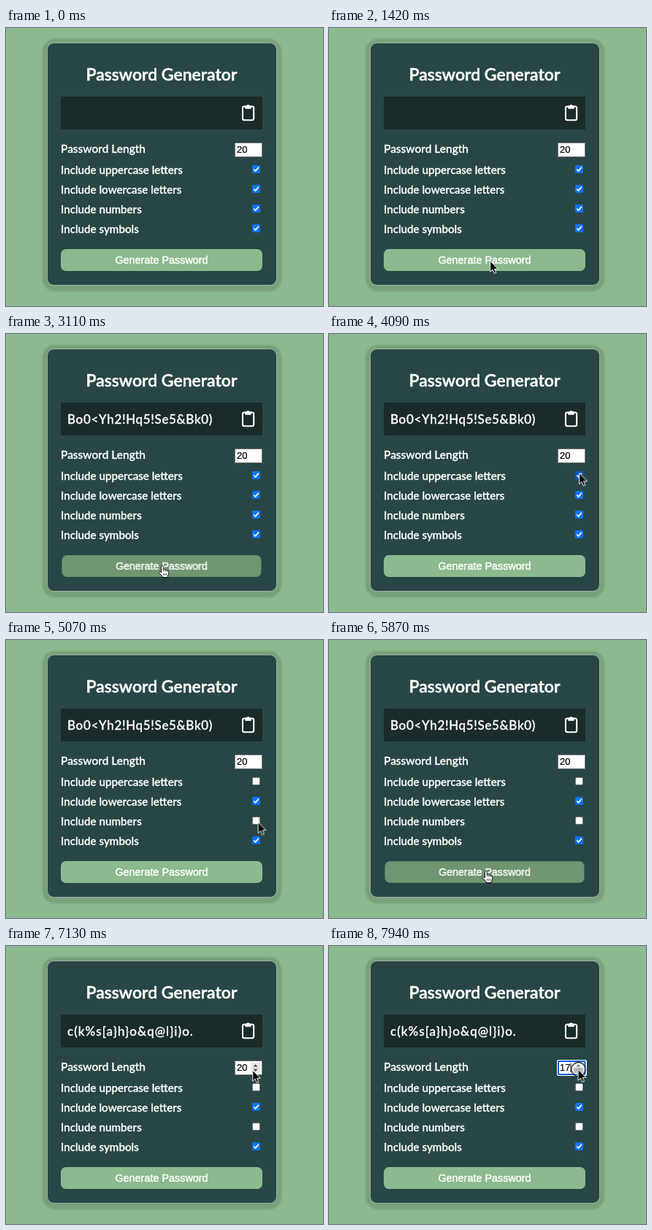
An HTML page for the animation above (8000 ms loop, 434 by 381 pixels).

```html
<!DOCTYPE html>
<html lang="en">
<head>
<meta charset="utf-8">
<title>Password Generator</title>
<style>
html, body { margin: 0; width: 100%; height: 100%; overflow: hidden; background: #8cb98d; }
svg { display: block; width: 434px; height: 381px; }
text { fill: #fff; stroke: #fff; stroke-width: .35px; font-family: Lato, "Open Sans", sans-serif; white-space: pre; }
.title { font-size: 23px; font-weight: 600; text-anchor: middle; stroke-width: .5px; }
.label { font-size: 15.2px; font-weight: 500; }
.label.wide { font-size: 15.5px; }
.pass { font-size: 17px; font-weight: 500; letter-spacing: .65px; }
.pass.second { letter-spacing: 1.05px; }
.btn text { font: 14.4px "Liberation Sans", Arial, sans-serif; text-anchor: middle; stroke-width: .45px; }
.num text { font: 13px "Liberation Sans", Arial, sans-serif; fill: #000; stroke: #000; stroke-width: .2px; }
.shadow { fill: #000; opacity: .13; filter: blur(1px); }
.box { fill: #fff; stroke: #767676; }
.blue { fill: #0f74f5; }
.tick { fill: none; stroke: #fff; stroke-width: 1.7; }

/* one shared 8 s clock */
.btn, .btn rect, .cur, .arrow, .hand, .ring, .p1, .p2, .c1, .c3, .c1 .blue, .c3 .blue,
.spin, .focus, .n20, .n19, .n18, .n17 { animation: 8s step-end infinite; }

.btn { transform-origin: 212.5px 318px; animation-name: press; }
.btn rect { fill: #8cb98d; animation-name: shade; }
@keyframes press {
  0%, 41.125%, 80.125% { transform: none; }
  32.125%, 72.25% { transform: scale(.989); }
}
@keyframes shade {
  0%, 41.125%, 80.125% { fill: #8cb98d; }
  32.125%, 72.25% { fill: #719571; }
}

.cur { animation-name: move; }
@keyframes move {
  0% { transform: translate(265px, 359px); opacity: 0; }
  10.125% { transform: translate(265px, 359px); opacity: 1; animation-timing-function: steps(3); }
  13.375% { transform: translate(247px, 347px); animation-timing-function: steps(4); }
  17.75% { transform: translate(221px, 319px); }
  18.875% { transform: translate(211px, 309px); }
  20% { transform: translate(211px, 316px); }
  22.125% { transform: translate(212.5px, 316.5px); }
  38.875% { transform: translate(214px, 317px); animation-timing-function: steps(2); }
  41.125% { transform: translate(240px, 295px); animation-timing-function: steps(3); }
  44.5% { transform: translate(318px, 222px); animation-timing-function: steps(4); }
  48.875% { transform: translate(341px, 196px); }
  50% { transform: translate(343px, 194px); }
  51.125% { transform: translate(343px, 190.5px); }
  52.25% { transform: translate(345.5px, 192.5px); }
  54.375% { transform: translate(345.5px, 194px); animation-timing-function: steps(4); }
  58.875% { transform: translate(345.5px, 249.5px); }
  66.625% { transform: translate(342px, 252px); animation-timing-function: steps(3); }
  70% { transform: translate(262px, 290px); animation-timing-function: steps(3); }
  73.375% { transform: translate(215px, 316px); }
  80.125% { transform: translate(245px, 288px); }
  81.25% { transform: translate(296.5px, 236.5px); animation-timing-function: steps(3); }
  84.625% { transform: translate(336px, 190px); animation-timing-function: steps(4); }
  89.125% { transform: translate(338px, 170px); }
  92.5%, 100% { transform: translate(341.5px, 169px); opacity: 1; }
}
.arrow { animation-name: arrow; }
@keyframes arrow {
  0%, 41.125%, 80.125% { opacity: 1; }
  22.125%, 72.25% { opacity: 0; }
}
.hand { animation-name: hand; }
@keyframes hand {
  0%, 41.125%, 80.125% { opacity: 0; }
  22.125%, 72.25% { opacity: 1; }
}
.ring { fill: #fff5; stroke: #1a1a1a; stroke-width: 1.3; animation-name: ring; }
@keyframes ring {
  0%, 26.625%, 34.375%, 54.375%, 63.375%, 77.875%, 95.875%, 98.125% { opacity: 0; }
  25.5%, 32.125%, 52.25%, 62.25%, 75.625%, 94.75%, 97%, 99.25%, 100% { opacity: 1; }
}

.p1 { animation-name: pass1; }
@keyframes pass1 { 0%, 77.875% { opacity: 0; } 34.375% { opacity: 1; } }
.p2 { animation-name: pass2; }
@keyframes pass2 { 0% { opacity: 0; } 77.875%, 100% { opacity: 1; } }

.c1 { animation-name: off1; }
@keyframes off1 { 0% { opacity: 1; } 54.375%, 100% { opacity: 0; } }
.c3 { animation-name: off3; }
@keyframes off3 { 0% { opacity: 1; } 63.375%, 100% { opacity: 0; } }
.c1 .blue { animation-name: dark1; }
@keyframes dark1 { 0% { fill: #0f74f5; } 50%, 100% { fill: #0b58c4; } }
.c3 .blue { animation-name: dark3; }
@keyframes dark3 { 0% { fill: #0f74f5; } 58.875%, 100% { fill: #0b58c4; } }

.spin { animation-name: spin; }
@keyframes spin { 0% { opacity: 0; } 86.875%, 100% { opacity: 1; } }
.focus { animation-name: focus; }
@keyframes focus { 0% { opacity: 0; } 94.75%, 100% { opacity: 1; } }
.n20 { animation-name: n20; }
@keyframes n20 { 0% { opacity: 1; } 94.75%, 100% { opacity: 0; } }
.n19 { animation-name: n19; }
@keyframes n19 { 0%, 97% { opacity: 0; } 94.75% { opacity: 1; } }
.n18 { animation-name: n18; }
@keyframes n18 { 0%, 99.25% { opacity: 0; } 97% { opacity: 1; } }
.n17 { animation-name: n17; }
@keyframes n17 { 0% { opacity: 0; } 99.25%, 100% { opacity: 1; } }
</style>
</head>
<body>
<svg viewBox="0 0 434 381">
  <defs>
    <rect id="empty" class="box" x=".5" y=".5" width="10" height="10" rx="1.5"/>
    <g id="mark">
      <rect width="11" height="11" rx="2"/>
      <path class="tick" d="M2.3 5.7 4.6 8 8.8 2.8"/>
    </g>
  </defs>

  <rect class="shadow" x="50" y="15" width="327" height="346" rx="17"/>
  <rect x="56.5" y="20.5" width="314" height="332" rx="9" fill="#294646" stroke="#9fb0a9"/>
  <text class="title" x="213" y="71.5">Password Generator</text>

  <rect x="75" y="94" width="276" height="45" fill="#1b2b2b"/>
  <text class="pass p1" x="84" y="123">Bo0&lt;Yh2!Hq5!Se5&amp;Bk0)</text>
  <text class="pass second p2" x="84" y="123">c(k%s[a}h}o&amp;q@l}i)o.</text>
  <rect x="324" y="107.5" width="15.2" height="18.7" rx="2.2" fill="none" stroke="#fff" stroke-width="2.1"/>
  <path d="M327.3 106.6h2a2.3 2.3 0 0 1 4.4 0h2v4.2h-8.4z" fill="#fff"/>

  <text class="label wide" x="75" y="171">Password Length</text>
  <text class="label" x="75" y="200">Include uppercase letters</text>
  <text class="label" x="75" y="227">Include lowercase letters</text>
  <text class="label" x="75" y="254">Include numbers</text>
  <text class="label" x="75" y="281">Include symbols</text>

  <g class="num">
    <rect class="box" x="313.5" y="157.5" width="37" height="19"/>
    <g class="focus">
      <rect x="312" y="156" width="41" height="22" rx="2.5" fill="#fff"/>
      <rect x="314" y="158" width="36.5" height="18" rx="1" fill="#fff" stroke="#1560cf" stroke-width="2"/>
      <path d="M331 160.5V173" stroke="#000"/>
    </g>
    <g class="spin">
      <rect x="335" y="160" width="13" height="14" fill="#e8e8e8"/>
      <rect class="focus" x="335" y="167" width="13" height="7" fill="#9a9a9a"/>
      <path d="M338.5 165.5 341.5 162l3 3.5zM338.5 168.5l3 3.5 3-3.5z" fill="#505050"/>
    </g>
    <text class="n20" x="316" y="171">20</text>
    <text class="n19" x="316" y="171">19</text>
    <text class="n18" x="316" y="171">18</text>
    <text class="n17" x="316" y="171">17</text>
  </g>

  <use href="#empty" x="337" y="188"/>
  <g class="c1"><g class="blue"><use href="#mark" x="337" y="188"/></g></g>
  <g class="blue"><use href="#mark" x="337" y="215"/></g>
  <use href="#empty" x="337" y="242"/>
  <g class="c3"><g class="blue"><use href="#mark" x="337" y="242"/></g></g>
  <g class="blue"><use href="#mark" x="337" y="269"/></g>

  <g class="btn">
    <rect x="75" y="303" width="276" height="30" rx="7"/>
    <text x="213" y="323">Generate Password</text>
  </g>

  <g class="cur">
    <circle class="ring" r="9.6"/>
    <path class="arrow" d="M-.3.3V15.2L3 12.1 5.3 17.4 7.8 16.4 5.6 11.2H10.4Z" fill="#000" stroke="#fff"/>
    <g class="hand" stroke="#000" stroke-width=".9" stroke-linejoin="round">
      <path fill="#fff" d="M-1.5 10V1.7a1.4 1.4 0 0 1 2.8 0V6q1.3-1 2.6.3 1.4-.8 2.5.5 2.3-.3 2.3 1.7V11q0 2-1.2 3.5v2.1H.3V15.3L-4.2 10.6q-.9-1.7.8-1.8 1 0 1.9 1.2Z"/>
      <path fill="none" d="M1.3 6v2.5M3.9 6.3v2.4M6.4 6.8v2.2M1.8 11v3M3.9 11v3M6 11v3" stroke-width=".7"/>
    </g>
  </g>
</svg>
</body>
</html>
```
